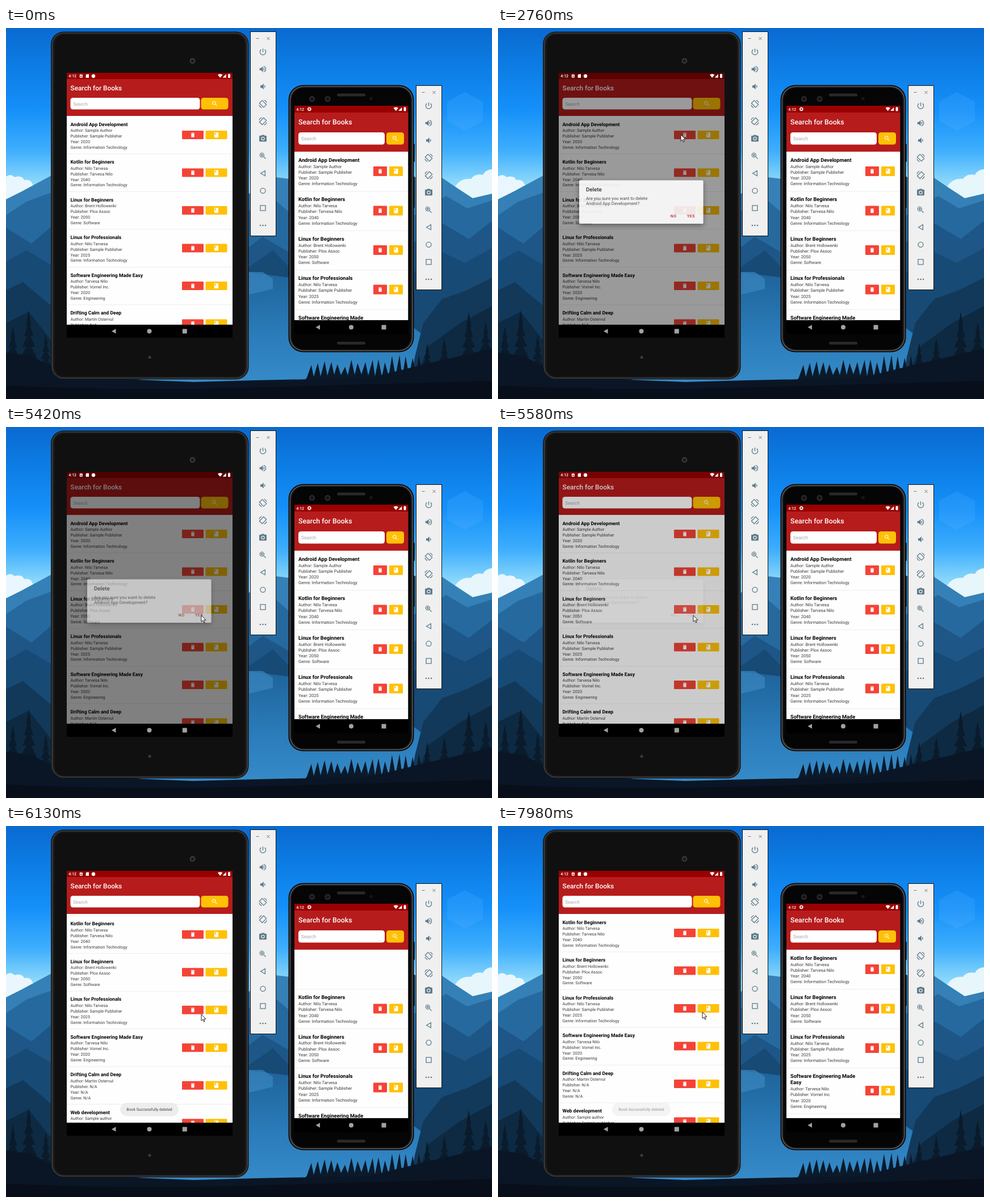
These frames come from a looping animation (856 by 654 pixels, 8000 ms). An HTML page:

```html
<!DOCTYPE html>
<html lang="en">
<head>
<meta charset="utf-8">
<title>Search for Books</title>
<style>
html, body { margin: 0; width: 100%; height: 100%; overflow: hidden; background: #0a1420; }
svg { display: block; width: 100vw; height: 100vh; }
text { font-family: Roboto, "Open Sans", sans-serif; text-rendering: geometricPrecision; white-space: pre; }
</style>
</head>
<body>
<svg id="stage" viewBox="0 0 856 654" xmlns="http://www.w3.org/2000/svg"></svg>
<script>
const LOOP = 8000;
const stage = document.getElementById('stage');

// ---------- markup helpers ----------
const rect = (x, y, w, h, fill, r = 0, extra = '') =>
  `<rect x="${x}" y="${y}" width="${w}" height="${h}" rx="${r}" fill="${fill}" ${extra}/>`;
const circle = (x, y, r, fill, extra = '') => `<circle cx="${x}" cy="${y}" r="${r}" fill="${fill}" ${extra}/>`;
const path = (d, fill, extra = '') => `<path d="${d}" fill="${fill}" ${extra}/>`;
const text = (x, y, size, str, fill, weight = 400, extra = '') =>
  `<text x="${x}" y="${y}" font-size="${size}" font-weight="${weight}" fill="${fill}" ${extra}>${str}</text>`;
const group = (body, extra = '') => `<g ${extra}>${body}</g>`;
const icon = (name, x, y, size, fill) =>
  group(icons[name], `transform="translate(${x - size / 2} ${y - size / 2}) scale(${size / 24})" fill="${fill}" stroke="none"`);

const shape = d => `<path d="${d}" fill-rule="evenodd"/>`;
const line = d => `<path d="${d}" fill="none" stroke="#5c7a89" stroke-width="2"/>`;
const speaker = 'M3 9v6h4l5 5V4L7 9z';
const rotate = line('M10 2.500L21.500 14L14 21.500L2.500 10Z M2 15a9 9 0 0 0 7 7 M15 2a9 9 0 0 1 7 7');
const lens = 'M15.5 14h-.8l-.3-.3A6.5 6.5 0 1 0 13.700 14.400l.3.3v.8l5 5 1.500-1.500zM9.500 14a4.500 4.500 0 1 1 0-9 4.500 4.500 0 0 1 0 9z';
const icons = {
  trash: shape('M6 19c0 1.100.9 2 2 2h8c1.100 0 2-.9 2-2V7H6zM19 4h-3.500l-1-1h-5l-1 1H5v2h14z'),
  book: shape('M18 2H6a2 2 0 0 0-2 2v16a2 2 0 0 0 2 2h12a2 2 0 0 0 2-2V4a2 2 0 0 0-2-2zM6 4h5v8l-2.500-1.500L6 12z'),
  search: shape(lens),
  power: line('M12 3V13 M7 6a8 8 0 1 0 10 0'),
  volUp: shape(speaker + 'M14 8v8a4.500 4.500 0 0 0 0-8z') + line('M14 4.300a8 8 0 0 1 0 15.400'),
  volDown: group(shape(speaker + 'M14 8v8a4.500 4.500 0 0 0 0-8z'), 'transform="translate(2)"'),
  rotateL: rotate,
  rotateR: group(rotate, 'transform="matrix(-1 0 0 1 24 0)"'),
  camera: shape('M9 2L7.200 4H4a2 2 0 0 0-2 2v12a2 2 0 0 0 2 2h16a2 2 0 0 0 2-2V6a2 2 0 0 0-2-2h-3.200L15 2zM12 17a5 5 0 1 1 0-10 5 5 0 0 1 0 10z') + '<circle cx="12" cy="12" r="3.200"/>',
  zoom: shape(lens) + line('M9.500 6.500v6M6.500 9.500h6'),
  back: line('M18 5V19L6 12Z'),
  home: line('M19 12a7 7 0 1 1-14 0a7 7 0 1 1 14 0'),
  recent: line('M5 5H19V19H5Z'),
  dots: '<circle cx="5" cy="12" r="2"/><circle cx="12" cy="12" r="2"/><circle cx="19" cy="12" r="2"/>'
};

// ---------- wallpaper ----------
let seed = 7;
const rnd = () => (seed = seed * 16807 % 2147483647) / 2147483647;

function pine(x, top, base, w, fill) {
  const n = 5, step = (base - top) / n;
  let d = '';
  for (let i = 0; i < n; i++) {
    const half = w * (i + 1.300) / n / 2, y = top + i * step;
    d += `M${x} ${y - step * .4}L${x + half} ${y + step}H${x - half}Z`;
  }
  return path(d, fill);
}

function wallpaper() {
  let spikes = 'M520 632';
  for (let x = 530; x < 735; x += 12) {
    spikes += `L${x} ${616 - rnd() * 6}L${x + 5 + rnd() * 3} ${598 - rnd() * 14 - Math.max(0, x - 640) * .2}`;
  }
  const pines = [[40, 505, 600, 34], [12, 532, 610, 32], [70, 545, 610, 26], [815, 508, 600, 34], [845, 525, 600, 34], [772, 552, 610, 28], [742, 560, 615, 24]];
  return rect(0, 0, 856, 654, 'url(#sky)') + rect(0, 0, 856, 400, 'url(#glow)') +
    path('M808 113L840 130V164L808 181L777 164V130Z', '#5fb6ff', 'opacity=".2"') +
    path('M0 262Q8 256 15 263Q28 259 32 268Q44 266 47 276L62 290L0 312Z', '#e9f6fd') +
    path('M856 249Q844 250 840 259Q826 256 819 266Q802 264 792 278L780 300L856 312Z', '#e6f6fa') +
    path('M0 302L28 288L52 275L80 260L200 230L330 300L428 292L466 262L500 266L600 250L690 262L768 264L790 279L822 300L856 292V654H0Z', '#3580b6') +
    path('M0 330L36 306L80 290L240 330L428 322L470 300L505 330L720 330L775 296L812 318L856 304V654H0Z', '#25699f') +
    path('M0 352L45 380L80 350L250 420L430 385L452 368L510 402L700 390L770 345L815 372L856 340V654H0Z', '#1d5687') +
    path('M0 412L36 392L80 418L430 420L470 392L505 428L720 430L768 395L808 414L856 388V654H0Z', '#174a75') +
    path('M150 654L240 470L420 430L500 440L640 470L760 560L740 654Z', 'url(#lake)') +
    path('M428 430H452L470 442V460L428 470Z', '#3f8dc5', 'opacity=".6"') +
    path('M0 462L30 448L80 490L150 560L250 630H0Z', '#12395a') +
    path('M856 440L812 462L768 478L735 520L720 580L712 630H856Z', '#12395a') +
    path('M0 520L40 500L95 570L190 625H0Z M856 490L800 520L745 560L715 630H856Z', '#0d2a42') +
    pines.map(p => pine(...p, '#0a1b2b')).join('') +
    path(spikes + 'L745 632Z', '#0a1a2b') +
    path('M0 572L45 578L95 605L230 620L330 624L440 621L540 619L640 617L740 592L856 565V654H0Z', '#0a1626') +
    path('M0 630Q200 640 420 634T856 622V654H0Z', '#080f1b');
}

// ---------- emulator tool strip ----------
function strip(dx, dy) {
  const names = ['power', 'volUp', 'volDown', 'rotateL', 'rotateR', 'camera', 'zoom', 'back', 'home', 'recent', 'dots'];
  return group(rect(430.5, 6.5, 45, 360, '#f0f0f0', 0, 'stroke="#111"') +
    path('M440.500 18.500H445.500M459.500 16L464.500 21M464.500 16L459.500 21', 'none', 'stroke="#777"') +
    names.map((n, i) => icon(n, 452.5, 42 + i * 30.6, 15.5, '#5c7a89')).join(''), `transform="translate(${dx} ${dy})"`);
}

// ---------- book app ----------
const IT = 'Information Technology';
const books = [
  ['Android App Development', 'Sample Author', 'Sample Publisher', '2020', IT],
  ['Kotlin for Beginners', 'Nilo Tarvesa', 'Tarvesa Nilo', '2040', IT],
  ['Linux for Beginners', 'Brent Hollowenki', 'Plox Assoc', '2050', 'Software'],
  ['Linux for Professionals', 'Nilo Tarvesa', 'Sample Publisher', '2025', IT],
  ['Software Engineering Made Easy', 'Tarvesa Nilo', 'Vornel Inc.', '2020', 'Engineering'],
  ['Drifting Calm and Deep', 'Martin Ostervul', 'N/A', 'N/A', 'N/A'],
  ['Web development', 'Sample author', 'Sample publisher', '2020', IT]
];
const labels = ['Author', 'Publisher', 'Year', 'Genre'];

const tablet = {
  id: 'tab', x: 107, w: 292, top: 79, head: 90, list: 155, foot: 523, end: 546, pad: 113.5,
  title: [110, 11.8], field: [113.5, 123, 228, 20.5, 8.3], go: [343.5, 48], hint: 137,
  row: 66.5, name: [17.8, 8.65], info: [28.2, 9.9, 7.33], mid: 33.5, btn: [310, 351.5, 38, 15],
  nav: [190, 252.5, 314.800, 534.5]
};
const phone = {
  id: 'pho', x: 508, w: 200.5, top: 137, head: 149, list: 218, foot: 515, end: 540, pad: 515,
  title: [170.2, 12.3], field: [515, 184, 152, 21.5, 8.6], go: [670, 31], hint: 198,
  row: 69.5, name: [17.6, 9.2], info: [28.5, 10.3, 7.6], mid: 34.5, btn: [647, 675, 24, 17], wrap: true,
  nav: [549.5, 608, 665.5, 527.5]
};

function bookRow(d, [name, ...info], y, i) {
  const wraps = d.wrap && name.length > 25, drop = wraps ? 11 : 0;
  const cut = wraps ? name.lastIndexOf(' ') : name.length;
  const [bx1, bx2, bw, bh] = d.btn, cy = d.mid + drop / 2;
  const button = (x, fill, glyph) => rect(x, cy - bh / 2, bw, bh, fill, 1.2) + icon(glyph, x + bw / 2, cy, 10.8, '#fff');
  return group(
    (i ? rect(d.x, 0, d.w, .8, '#e9e9e9') : '') +
    text(d.pad, d.name[0], d.name[1], name.slice(0, cut), '#000', 700) +
    (wraps ? text(d.pad, d.name[0] + 11, d.name[1], name.slice(cut + 1), '#000', 700) : '') +
    info.map((v, k) => text(d.pad, d.info[0] + drop + k * d.info[1], d.info[2], `${labels[k]}: ${v}`, '#3a3a3a')).join('') +
    button(bx1, '#f44336', 'trash') + button(bx2, '#ffc107', 'book'),
    `transform="translate(0 ${y})"`);
}

function statusIcons(d) {
  const right = d.x + d.w, y = (d.top + d.head) / 2;
  return text(d.x + 3.3, y + 2.6, 7, '4:12', '#fff', 500) +
    path(`M${right - 26} ${y - 2}Q${right - 21.800} ${y - 5} ${right - 17.600} ${y - 2}L${right - 21.800} ${y + 3.200}Z M${right - 11.200} ${y - 3.300}V${y + 3}H${right - 17.500}Z`, '#fff') +
    rect(right - 8, y - 3, 4, 6.4, '#fff', .6) + rect(right - 7, y - 3.8, 2, 1, '#fff');
}

function app(d) {
  let y = d.list, rows = '';
  books.forEach((b, i) => {
    const row = bookRow(d, b, y, i);
    rows += i ? row : group(row, `id="${d.id}First"`) + `<g id="${d.id}Rest">`;
    y += d.row + (d.wrap && b[0].length > 25 ? 11 : 0);
  });
  const [fx, fy, fw, fh, fs] = d.field, [gx, gw] = d.go, [n1, n2, n3, ny] = d.nav;
  return `<clipPath id="${d.id}Clip">${rect(d.x, d.list, d.w, d.foot - d.list, '#fff')}</clipPath>` +
    rect(d.x, d.top, d.w, d.end - d.top, '#000', d.wrap ? 7 : 0) +
    rect(d.x, d.top, d.w, d.head - d.top, '#990000') + rect(d.x, d.head, d.w, d.list - d.head, '#b71c1c') +
    text(d.pad, d.title[0], d.title[1], 'Search for Books', '#fff', 500) +
    rect(fx, fy, fw, fh, '#fff', 4.5) + text(fx + 4.8, d.hint, fs, 'Search', '#a8a8a8') +
    rect(gx, fy, gw, fh, '#ffc107', 4.5) + icon('search', gx + gw / 2, fy + fh / 2, 12, '#fff') +
    group(rect(d.x, d.list, d.w, d.foot - d.list, '#fefefe') + rows + '</g>', `clip-path="url(#${d.id}Clip)"`) +
    path(`M${n1 + 3.500} ${ny - 4.300}V${ny + 4.300}L${n1 - 4} ${ny}Z`, '#a2a2a2') +
    circle(n2, ny, 4, '#a2a2a2') + rect(n3 - 4, ny - 4, 8, 8, '#a2a2a2', .5);
}

// ---------- devices ----------
const tabletBody = rect(79, 6.5, 348.5, 613, '#151516', 22) + rect(80.5, 8, 345.5, 610, '#3e3e40', 21) +
  rect(82.5, 9.5, 341.5, 607, '#1a1a1b', 19) + rect(85.5, 11.5, 335.5, 603, '#101011', 17) +
  circle(328.5, 58, 5, '#38383a') + circle(328.5, 58, 2.6, '#161618') + circle(253, 580.5, 2.6, '#3a3a3c');

const phoneBody = rect(717, 204, 3, 32, '#1c1c1e', 1) + rect(717, 262, 3, 55, '#1c1c1e', 1) +
  rect(497.5, 100.5, 221, 471, '#0b0b0c', 26) + rect(499.5, 102.5, 217, 467, '#5a5a5c', 24) +
  rect(501, 104, 214, 464, '#161617', 23) + rect(503.5, 105.5, 209, 461, '#050506', 21) +
  [539, 566.5].map(x => circle(x, 125, 5.2, '#29292b') + circle(x, 125, 2.8, '#121214')).join('') +
  rect(583, 115.5, 50, 5, '#29292b', 2.5) + rect(583, 553, 50, 5, '#29292b', 2.5) + circle(643, 124.5, 3, '#151518');

const statusExtras = rect(129.8, 82, 5, 5.5, '#fff', .6) + rect(131.3, 84, 2, 2, '#990000') +
  path('M142 81.500H146V87.800H140.600V83Z', '#fff') + circle(154, 84.7, 3.2, '#fff') +
  circle(534.3, 143, 2.2, 'none', 'stroke="#fff" stroke-width="1.500"') +
  circle(534.3, 143, 3.2, 'none', 'stroke="#fff" stroke-width="1" stroke-dasharray="1.250"');

const dialog = group(
  rect(143, 268.5, 218.5, 76.5, '#fff', 1.5, 'filter="url(#shadow)"') +
  text(155, 287.8, 9.7, 'Delete', '#222', 500) +
  text(155, 302.6, 7.8, 'Are you sure you want to delete', '#444') +
  text(155, 312, 7.8, 'Android App Development?', '#444') +
  text(303.7, 333.8, 7, 'NO', '#b71c1c', 500, 'letter-spacing=".5"') +
  text(333, 333.8, 7, 'YES', '#b71c1c', 500, 'letter-spacing=".5"'), 'id="dialog" opacity="0"');

const dim = rect(107, 79, 292, 444, '#000', 0, 'id="dim" opacity="0"');

const toast = group(rect(201, 488, 103, 23.5, '#ededed', 11.7) +
  text(252.5, 502.2, 6.9, 'Book Successfully deleted', '#444', 400, 'text-anchor="middle"'), 'id="toast" opacity="0"');

stage.innerHTML = `<defs>
  <linearGradient id="sky" x2="0" y2="1"><stop stop-color="#0a6ad0"/><stop offset=".1" stop-color="#0c7ce4"/>
    <stop offset=".22" stop-color="#1590f9"/><stop offset=".33" stop-color="#3eaefd"/><stop offset=".42" stop-color="#8fdafb"/></linearGradient>
  <radialGradient id="glow" gradientUnits="userSpaceOnUse" r="1" gradientTransform="translate(620 268) scale(260 100)">
    <stop stop-color="#f0f8c8"/><stop offset=".5" stop-color="#c8f0d0" stop-opacity=".85"/><stop offset="1" stop-color="#8fd8f5" stop-opacity="0"/></radialGradient>
  <linearGradient id="lake" x2="0" y2="1"><stop stop-color="#1f639a"/><stop offset=".5" stop-color="#2a7cba"/><stop offset="1" stop-color="#3a90cc"/></linearGradient>
  <filter id="shadow" x="-10%" y="-20%" width="120%" height="150%"><feDropShadow dx="0" dy="3" stdDeviation="4" flood-opacity=".45"/></filter>
</defs>` + wallpaper() + tabletBody + app(tablet) + strip(0, 0) + phoneBody + app(phone) + strip(292, 95) +
  toast + circle(322, 188.5, 10, '#000', 'id="press" fill-opacity=".18" opacity="0"') + dim +
  statusIcons(tablet) + statusIcons(phone) + statusExtras + dialog +
  path('M0 0V11.300L2.600 8.900L4.400 13L6.200 12.200L4.400 8.200H8Z', '#fff', 'id="cursor" stroke="#111" stroke-width=".9" stroke-linejoin="round"');

// ---------- motion ----------
const clamp = v => Math.min(1, Math.max(0, v));
const span = (t, a, b) => clamp((t - a) / (b - a));
const ease = f => (1 - Math.cos(Math.PI * f)) / 2;
const el = id => document.getElementById(id);

const bursts = [[410, 810, 6], [1130, 1430, 5], [1670, 1750, 2], [2370, 2370, 1], [2530, 2920, 6],
  [4180, 4870, 10], [5340, 5660, 5], [5820, 6350, 8], [7520, 7980, 7]];

function hold(t) {
  const burst = bursts.filter(b => b[0] <= t + 8).pop();
  if (!burst) return 0;
  const [a, b, n] = burst;
  if (n < 2) return a;
  const gap = (b - a) / (n - 1);
  return a + gap * Math.min(n - 1, Math.floor((t - a + 8) / gap));
}

const trail = [[410, 794, 596], [810, 405, 230], [1050, 405, 230], [1430, 316, 186], [1600, 316, 186], [1750, 322, 188],
  [4100, 322, 188], [4180, 323, 195], [4640, 354, 300], [4870, 344, 332], [7440, 344, 332], [7980, 360, 328]];

function pointer(t) {
  const i = trail.findIndex(p => p[0] >= t);
  if (i < 1) return i ? trail[trail.length - 1].slice(1) : trail[0].slice(1);
  const [a, x1, y1] = trail[i - 1], [b, x2, y2] = trail[i], f = ease(span(t, a, b));
  return [x1 + (x2 - x1) * f, y1 + (y2 - y1) * f];
}

function removeFirst(d, t, fade, move, end) {
  el(d.id + 'First').setAttribute('opacity', 1 - span(t, fade, fade + 120));
  el(d.id + 'Rest').setAttribute('transform', `translate(0 ${-d.row * ease(span(t, move, end))})`);
}

function draw(time) {
  const t = hold(time);
  const show = (id, v) => el(id).setAttribute('opacity', v);
  const open = span(t, 2500, 2900), close = span(t, 5300, 5660);
  show('dim', .6 * open * (1 - close ** 1.6));
  show('dialog', (1 - (1 - open) ** 2) * (1 - close) ** 1.5);
  show('press', t >= 2370 && t < 2530 ? 1 : 0);
  show('toast', span(t, 5980, 6120) * (1 - .45 * span(t, 7880, 7980)));
  removeFirst(tablet, t, 5800, 5905, 6155);
  removeFirst(phone, t, 5990, 6122, 6350);
  show('cursor', t >= 410 ? 1 : 0);
  el('cursor').setAttribute('transform', `translate(${pointer(t).join(' ')})`);
}

const begin = performance.now();
function tick() {
  draw((performance.now() - begin) % LOOP);
  requestAnimationFrame(tick);
}
tick();
</script>
</body>
</html>
```
